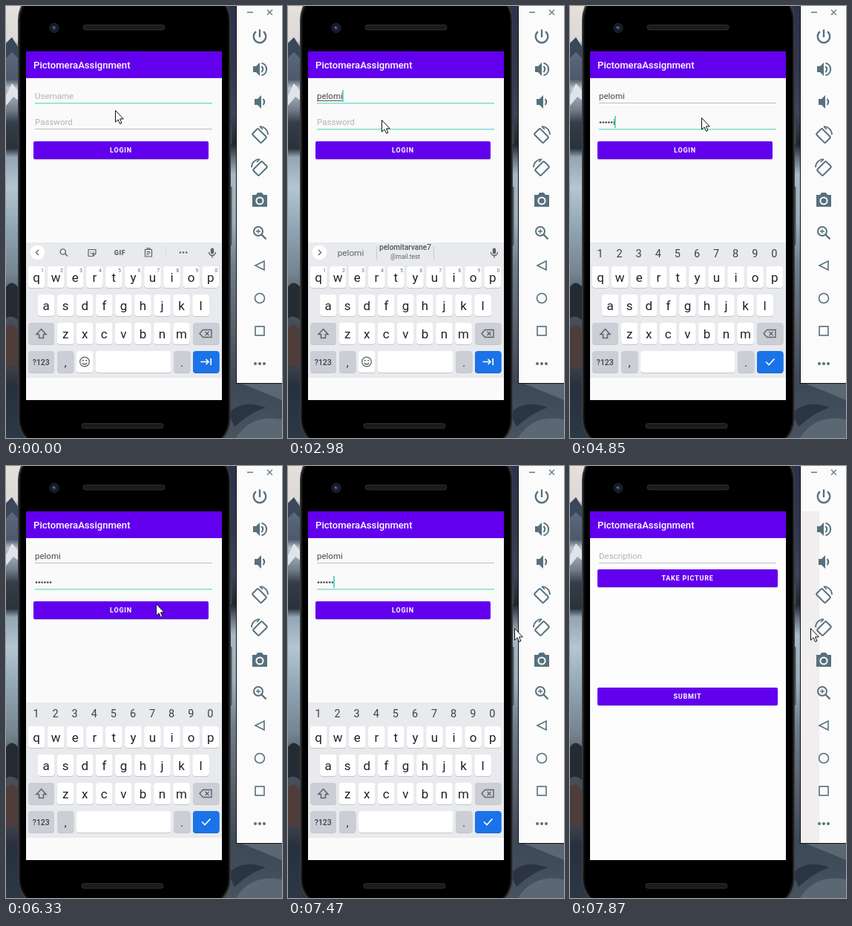
These frames come from a looping animation (372x581 px, 8000 ms). An HTML page:

```html
<!DOCTYPE html>
<html lang="en">
<head>
<meta charset="utf-8">
<title>Login flow</title>
<style>
html, body { margin: 0; width: 100%; height: 100%; overflow: hidden; }
svg { display: block; width: 372px; height: 581px; }
text { font-family: Roboto, "Open Sans", sans-serif; white-space: pre; }
</style>
</head>
<body>
<svg id="stage" viewBox="0 0 372 581"></svg>
<script>
const LOOP = 8000;
const USER = 'pelomi';
const PASSWORD = 'vaskmi';
const PURPLE = '#6200ee', TEAL = '#80e0cf', INK = '#202124', SOFT = '#5f6368', SLATE = '#57707d';
const PANEL = '#fbfbfb', DOT_PITCH = 3.8;

// Markup helpers
const rect = (x, y, w, h, fill, r = 0, extra = '') =>
  `<rect x="${x}" y="${y}" width="${w}" height="${h}" rx="${r}" fill="${fill}" ${extra}/>`;
const label = (x, y, size, fill, str, extra = 'text-anchor="middle"') =>
  `<text x="${x}" y="${y}" font-size="${size}" fill="${fill}" ${extra}>${str}</text>`;
const circle = (x, y, r, fill, extra = '') => `<circle cx="${x}" cy="${y}" r="${r}" fill="${fill}" ${extra}/>`;
const line = (d, color, w = 1.4, extra = '') =>
  `<path d="${d}" fill="none" stroke="${color}" stroke-width="${w}" ${extra}/>`;
const solid = (d, fill) => `<path d="${d}" fill="${fill}"/>`;
const group = (id, body) => `<g id="${id}">${body}</g>`;
const move = (x, y, body, more = '') => `<g transform="translate(${x} ${y}) ${more}">${body}</g>`;
const dots = (x, y, gap, r, fill) => [-gap, 0, gap].map(d => circle(x + d, y, r, fill)).join('');

function backdrop() {
  const slope = (id, colors) => `<linearGradient id="${id}" x2="0" y2="1">${colors.map(([o, c]) =>
    `<stop offset="${o}%" stop-color="${c}"/>`).join('')}</linearGradient>`;
  const left = [[0, '#e6dfda'], [8, '#dcd9d8'], [10, '#5c6a80'], [17, '#4d596b'], [19, '#b9c2cc'], [24, '#737e8b'],
    [27, '#343d48'], [33, '#2a323b'], [35, '#93a5b3'], [42, '#b4c6d2'], [52, '#8fa3b2'], [62, '#74838f'],
    [69, '#4a555f'], [84, '#3a3f48'], [88, '#27303d'], [100, '#2d3846']];
  const right = [[0, '#2b324a'], [15, '#30374e'], [25, '#3b445a'], [32, '#20262e'], [35, '#5e6b78'],
    [39, '#a8b7c2'], [50, '#9badb9'], [60, '#6f7e8a'], [74, '#57626d'], [87, '#3d4857'], [100, '#48535f']];
  return `<defs>${slope('leftScene', left)}${slope('rightScene', right)}</defs>` +
    rect(0, 0, 160, 581, 'url(#leftScene)') + rect(160, 0, 212, 581, 'url(#rightScene)') +
    solid('M0 50L8 42L18 58V72L8 62L0 70Z', '#3a475b') +
    solid('M0 120L8 104L18 116V128L10 122L0 134Z', '#dfe4ea') +
    solid('M0 378Q8 366 18 380V424Q8 414 0 420Z', '#242b32') +
    solid('M0 432Q10 422 18 440V488Q8 480 0 486Z', '#4f3d3c') +
    solid('M318 508H372V530Q348 520 318 508ZM310 581Q330 548 372 556V581Z', '#5b6772') +
    solid('M300 548Q318 528 350 540Q330 546 308 566Z', '#2b3442');
}

function phone() {
  const speaker = (x, y) => rect(x, y, 110, 6.5, '#1b1b1b', 3.2, 'stroke="#303030"');
  return rect(301, 160, 3.5, 26, '#44484c', 1) + rect(301, 243, 3.5, 79, '#50555a', 1) +
    rect(16, -22, 287, 618, '#3c3f43', 40) + rect(17.5, -20, 284, 614, '#161616', 39) +
    rect(19.5, -18, 280, 610, '#000', 37) +
    speaker(104, 25.5) + speaker(102, 561.5) +
    circle(65, 29.5, 6, '#15181f', 'stroke="#2a2d33"') + circle(65, 29.5, 2.6, '#27406b') + circle(64, 28.5, 1, '#6f8cc0');
}

function toolbar() {
  const speaker = 'M-9 -4H-5L0 -9V9L-5 4H-9Z';
  const turn = rect(-5.5, -8.5, 11, 17, 'none', 1.5, `transform="translate(-.5 1.5) rotate(-45)" stroke="${SLATE}" stroke-width="2"`) +
    line('M0 -11A11 11 0 0 1 11 0M4 -7L0 -11', SLATE, 1.7);
  return rect(310, -2, 64, 510, '#111') + rect(311, -2, 62, 509, PANEL) +
    rect(311, 61, 25, 446, '#f0eeee', 0, 'id="shade"') +
    line('M325 8.5H333M352 5L359 12M359 5L352 12', '#607985', 1.3) +
    move(342, 41, line('M-5 -6.6A8.3 8.3 0 1 0 5 -6.6M0 -9.5V1', SLATE, 2.3)) +
    move(342, 85, solid(speaker, SLATE) + line('M2.5 -4Q6 0 2.5 4M2.5 -8.3A8.5 8.5 0 0 1 2.5 8.3', SLATE, 2)) +
    move(344, 129, solid(speaker, SLATE) + line('M2.5 -4Q6 0 2.5 4', SLATE, 2)) +
    move(342, 173, turn) + move(342, 217, turn, 'scale(-1 1)') +
    move(342, 261, solid('M-10 -7H-5L-3 -10H3L5 -7H10V9H-10Z', SLATE) +
      circle(0, 1, 4.6, SLATE, `stroke="${PANEL}" stroke-width="2"`)) +
    move(342, 305, circle(-2, -2, 6, 'none', `stroke="${SLATE}" stroke-width="2"`) +
      line('M2.5 2.5L8.5 8.5', SLATE, 2.4) + line('M-5 -2H1M-2 -5V1', SLATE, 1.3)) +
    line('M348 343V355L336 349Z', SLATE, 1.6) +
    circle(342, 393, 6.5, 'none', `stroke="${SLATE}" stroke-width="1.6"`) +
    rect(336, 431, 12, 12, 'none', 0, `stroke="${SLATE}" stroke-width="1.6"`) +
    dots(342, 481, 6, 2, SLATE);
}

const appBar = rect(27, 61, 264, 36, PURPLE) +
  label(37, 84, 13.1, '#fff', 'PictomeraAssignment', 'font-weight="500"');
const button = (x, y, w, str) => rect(x, y + 1, w, 24, '#000', 2, 'opacity=".15"') + rect(x, y, w, 24, PURPLE, 2) +
  label(x + w / 2, y + 15, 9, '#fff', str, 'text-anchor="middle" font-weight="700" letter-spacing=".8"');
const hint = (y, str, id) => label(39, y, 11.5, '#b2b2b2', str, `id="${id}"`);
const field = (y, id) => rect(39, y, 239, 1, '#bdbdbd', 0, `id="${id}"`);

function loginForm() {
  return rect(27, 61, 264, 469, '#fafafa') + appBar +
    hint(125, 'Username', 'userHint') + label(39, 125, 11.5, '#4a4a4a', '', 'id="userText"') +
    rect(39, 127, 0, 1, '#555', 0, 'id="composing"') + field(130, 'userLine') +
    hint(160, 'Password', 'passHint') + group('passText', '') + field(165, 'passLine') +
    rect(0, 0, 2, 16, '#62d9c7', 0, 'id="caret"') +
    button(37, 182, 236, 'LOGIN') +
    `<clipPath id="loginClip">${rect(37, 182, 236, 24, '#fff', 2)}</clipPath>` +
    `<g clip-path="url(#loginClip)">${circle(203, 190, 0, '#fff', 'id="ripple"')}</g>`;
}

function keyboard() {
  const key = (x, y, w, fill = '#fff', shadow = '#c3c6ca') => rect(x, y + 1, w, 29, shadow, 4) + rect(x, y, w, 29, fill, 4);
  const letters = (str, first, y) => [...str].map((c, i) => {
    const x = first + i * 26.05;
    return key(x - 11.3, y, 22.6) + label(x, y + 20.5, 17, INK, c);
  }).join('');
  const GRAY = '#cbced4';
  const digits = (x, y, size, fill, gap) =>
    [...'1234567890'].map((d, i) => label(x + i * gap, y, size, fill, d)).join('');
  const mic = rect(275.8, 325.5, 4.4, 8, SOFT, 2.2) + line('M273.5 331A4.5 4.5 0 0 0 282.5 331M278 335.5V338.5', SOFT);
  const disc = circle(42.5, 331.5, 9.8, '#fff');
  const icons = disc + line('M44 328L40.5 331.5L44 335', SOFT) +
    circle(76.8, 330.5, 3.6, 'none', `stroke="${SOFT}" stroke-width="1.4"`) + line('M79.5 333L83 336.5', SOFT, 1.6) +
    line('M111 327.5H121V333L117.5 336.5H111ZM121 333H117.5V336.5M113.5 332Q115.5 334.5 118 332M114 329.5V330.5M118 329.5V330.5', SOFT, 1.2) +
    label(153.5, 335, 9, SOFT, 'GIF', 'text-anchor="middle" font-weight="900" letter-spacing=".5"') +
    line('M187.5 327.5H196.5V337H187.5ZM190 327V325.8H194V327M189.5 330.5H194.5M189.5 332.5H194.5M189.5 334.5H192.5', SOFT, 1.2) +
    rect(215, 323, 1, 17, '#dadce0') + dots(239, 331.5, 4.2, 1.3, SOFT) + mic;
  const suggestions = disc + line('M41 328L44.5 331.5L41 335', SOFT) +
    rect(119, 323, 1, 18, '#c6c9cd') + rect(196, 323, 1, 18, '#c6c9cd') + mic + group('words', '');
  const smile = circle(106, 478.5, 6.3, 'none', `stroke="${SOFT}" stroke-width="1.3"`) +
    line('M102.8 480Q106 484 109.2 480', SOFT, 1.3) + circle(103.8, 476.8, 1, SOFT) + circle(108.2, 476.8, 1, SOFT);
  return rect(27, 318, 264, 182, '#e8eaed') +
    group('icons', icons) + group('suggestions', suggestions) +
    group('digitStrip', digits(40.5, 337.5, 14.5, '#3c4043', 26.1)) +
    letters('qwertyuiop', 41.2, 350) + group('smallDigits', digits(49, 358, 6.5, SOFT, 26.05)) +
    letters('asdfghjkl', 54.2, 388) + letters('zxcvbnm', 80.2, 426) +
    key(30, 426, 35, GRAY) + line('M47.5 434.5L54 441.5H50.5V446.5H44.5V441.5H41Z', SOFT, 1.5) +
    key(252, 426, 35.5, GRAY) + line('M265.5 435.5H277V445.5H265.5L261 440.5ZM268.5 438L273.5 443M273.5 438L268.5 443', SOFT, 1.4) +
    key(30, 464, 35, GRAY) + label(47.3, 482.5, 10.5, '#3c4043', '?123', 'text-anchor="middle" font-weight="500"') +
    key(69, 464, 22.5, GRAY) + label(80.2, 485, 14, INK, ',') +
    key(226, 464, 22.5, GRAY) + label(237, 485, 14, INK, '.') +
    group('plainRow', key(95, 464, 22.5) + smile + key(121, 464, 101.5)) +
    group('secretRow', key(95, 464, 127.5)) +
    key(252, 464, 35.5, '#1a73e8', '#1a66cc') +
    group('nextKey', line('M262.5 478.5H273M269.5 475L273 478.5L269.5 482M276.2 474V483', '#fff', 1.7)) +
    group('doneKey', line('M264 478.5L268 482.5L275.5 474.5', '#fff', 1.7));
}

const postForm = rect(27, 61, 264, 469, '#fdfdfd') + appBar + hint(125, 'Description', 'descHint') +
  field(130, 'descLine') + button(37, 139, 243, 'TAKE PICTURE') + button(37, 298, 243, 'SUBMIT');
const pointer = '<path id="pointer" fill="#fff" stroke="#111" stroke-width="1" stroke-linejoin="round" ' +
  'd="M.5 .5V16.2L4.1 12.9L6.6 18.4L8.9 17.4L6.5 11.9H11.3Z"/>';

document.getElementById('stage').innerHTML = backdrop() + phone() + loginForm() + keyboard() +
  `<clipPath id="screen">${rect(27, 61, 264, 469, '#fff')}</clipPath>` +
  `<g clip-path="url(#screen)">${group('post', postForm)}</g>` + toolbar() + pointer;

// Timelines: [start ms, value], each held until the next entry
const pointerSteps = [[0, [147, 140]], [1900, null], [2300, [229, 49]], [2420, [164, 88]], [2570, [147, 130]],
  [2690, [138, 144]], [2850, [126, 153]], [3220, [134, 153]], [3340, [155, 151]], [3460, [170, 150]],
  [3580, [177, 150]], [5970, [192, 162]], [6090, [212, 176]], [6210, [218, 183]], [6330, [202, 185]],
  [6730, [203, 189]], [6870, [210, 193]], [6990, [228, 200]], [7110, [250, 208]], [7230, [274, 214]],
  [7350, [293, 217]], [7470, [305, 218]], [7590, [319, 218]], [7740, [324, 218]]];
const userSteps = [[0, 0], [510, 1], [890, 2], [1010, 3], [1130, 4], [1250, 5], [1370, 6]];
const passSteps = [[0, 0], [4080, 1], [4200, 2], [4320, 3], [4600, 4], [4850, 6]];
const caretSteps = [[0, false], [510, true], [2150, false], [2690, true], [5350, false], [5850, true], [6330, false], [6870, true]];
const wordSteps = [[0, []], [770, ['p', 'pe', 'pls']], [1010, ['pe', 'per', 'pen']], [1250, ['pel', USER, 'pelt']],
  [1520, ['pelo', USER, 'pelt']], [1640, [USER, '', '']], [1760, [USER, 'pelomitarvane7', '', '@mail.test']]];
const rippleSteps = [[0, [0, 0]], [6610, [70, .22]], [6730, [180, .22]], [6870, [180, .1]], [6990, [0, 0]]];
const postSteps = [[0, [0, 1]], [7590, [.45, .943]], [7740, [.92, .985]], [7870, [1, 1]]];

const held = (steps, t) => steps.reduce((v, [at, next]) => t >= at ? next : v, steps[0][1]);
const $ = id => document.getElementById(id);
const show = (id, on) => $(id).setAttribute('display', on ? 'inline' : 'none');
const set = (id, attrs) => { for (const k in attrs) $(id).setAttribute(k, attrs[k]); };

function drawWords([left = '', middle = '', right = '', domain]) {
  const word = (x, str) => label(x, 336, 11.8, SOFT, str);
  $('words').innerHTML = word(84.5, left) + word(231, right) + (domain
    ? label(158, 328, 10, '#505458', middle, 'text-anchor="middle" font-weight="500"') + label(158, 340, 8.4, SOFT, domain)
    : word(158, middle));
}

function drawPassword(count, masked) {
  let body = '';
  for (let i = 0; i < count; i++) {
    const x = 39 + i * DOT_PITCH;
    body += i === count - 1 && !masked
      ? label(x, 160, 11.5, '#4a4a4a', PASSWORD[i], 'id="lastChar"')
      : circle(x + 2, 156.5, 1.35, '#4a4a4a');
  }
  $('passText').innerHTML = body;
}

function render(t) {
  const typed = held(userSteps, t), secret = held(passSteps, t);
  const onPassword = t >= 3100, secretKeys = t >= 3220;

  $('userText').textContent = USER.slice(0, typed);
  const userWidth = typed ? $('userText').getComputedTextLength() : 0;
  show('userHint', !typed);
  show('composing', !onPassword);
  set('composing', { width: userWidth });
  drawPassword(secret, t >= 5850);
  show('passHint', !secret);
  set('userLine', { fill: onPassword ? '#bdbdbd' : TEAL, height: onPassword ? 1 : 1.5 });
  set('passLine', t >= 2980 ? { fill: TEAL, height: 1.5 } : { fill: '#bdbdbd', height: 1 });

  const last = $('lastChar');
  const passWidth = last ? (secret - 1) * DOT_PITCH + last.getComputedTextLength() : secret * DOT_PITCH;
  show('caret', held(caretSteps, t));
  set('caret', { x: Math.floor(39 + (onPassword ? passWidth : userWidth)), y: onPassword ? 148 : 113 });

  show('icons', t < 770);
  show('suggestions', t >= 770 && !secretKeys);
  drawWords(held(wordSteps, t));
  for (const id of ['digitStrip', 'secretRow', 'doneKey']) show(id, secretKeys);
  for (const id of ['smallDigits', 'plainRow', 'nextKey']) show(id, !secretKeys);

  const [r, alpha] = held(rippleSteps, t);
  set('ripple', { r, opacity: alpha });
  const [opacity, scale] = held(postSteps, t);
  show('post', opacity > 0);
  set('post', { opacity, transform: `translate(159 295.5) scale(${scale}) translate(-159 -295.5)` });
  show('shade', t >= 7740);

  const spot = held(pointerSteps, t);
  show('pointer', spot);
  if (spot) set('pointer', { transform: `translate(${spot})` });
}

const start = performance.now();
function tick() {
  render((performance.now() - start) % LOOP);
  requestAnimationFrame(tick);
}
tick();
</script>
</body>
</html>
```
